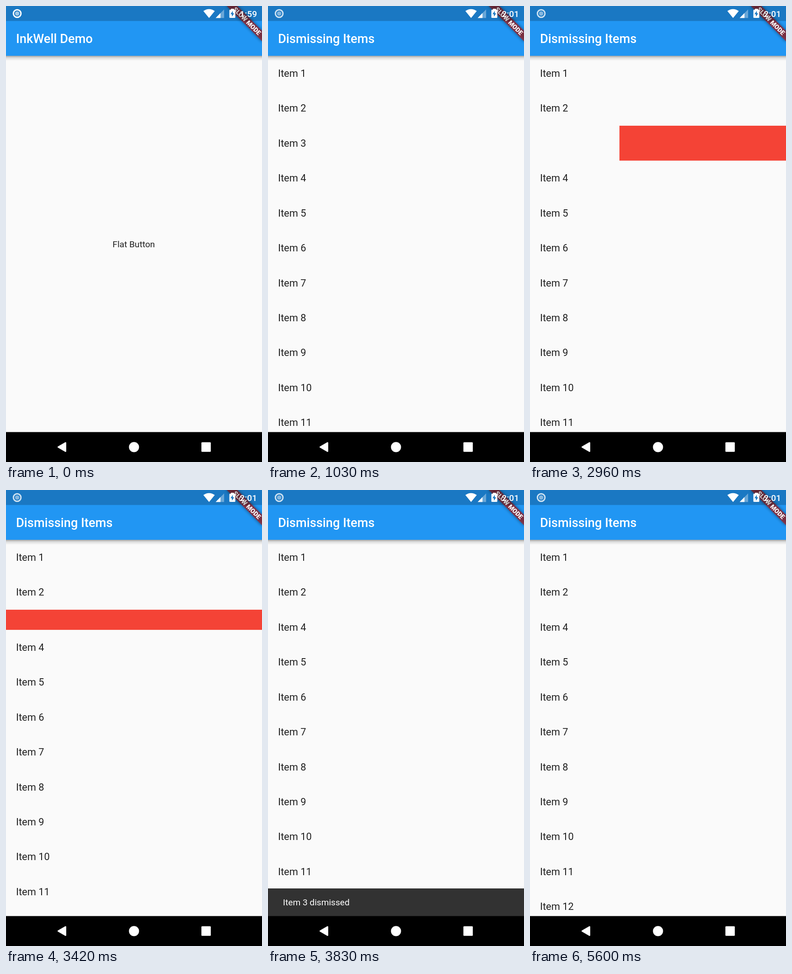
An HTML page for the animation above (6460 ms loop, 561 px wide and 998 px high).

```html
<!DOCTYPE html>
<html lang="en">
<head>
<meta charset="utf-8">
<title>Dismissing Items</title>
<style>
  html, body { margin: 0; width: 100%; height: 100%; overflow: hidden; background: #fafafa; }
  svg { display: block; width: 561px; height: 998px; font-family: Roboto, sans-serif; }
  .body { font-size: 21.84px; fill: #212121; }
  .small { font-size: 19.11px; }
  .title { font-size: 27.3px; font-weight: 500; fill: #fff; }
  .clock { font-size: 19.11px; font-weight: 500; fill: #fff; text-anchor: end; }
  .ribbon { font-size: 13.9px; font-weight: 900; fill: #fff; text-anchor: middle; }
</style>
</head>
<body>
<svg viewBox="0 0 561 998">
  <defs>
    <linearGradient id="shade" x2="0" y2="1">
      <stop offset="0" stop-opacity=".34"/>
      <stop offset=".4" stop-opacity=".12"/>
      <stop offset="1" stop-opacity="0"/>
    </linearGradient>
    <filter id="blur" x="-10%" y="-60%" width="120%" height="220%"><feGaussianBlur stdDeviation="3.5"/></filter>
  </defs>
  <rect width="561" height="998" fill="#fafafa"/>

  <text id="button" class="small" x="280" y="527.5" text-anchor="middle" fill="#212121">Flat Button</text>
  <g id="list" class="body"><rect id="reveal" y="262" fill="#f44336"/></g>

  <g id="snack">
    <rect y="872" width="561" height="62" fill="#323232"/>
    <text id="message" class="small" x="32.8" y="909" fill="#fff">Item 3 dismissed</text>
  </g>

  <!-- app bar and corner ribbon -->
  <rect y="109" width="561" height="11" fill="url(#shade)"/>
  <rect width="561" height="109" fill="#2196f3"/>
  <text id="title" class="title" x="22" y="80.5"></text>
  <g transform="translate(561 0) rotate(45)">
    <rect x="-55" y="38.2" width="110" height="16.4" fill-opacity=".5" filter="url(#blur)"/>
    <rect x="-55" y="38.2" width="110" height="16.4" fill="#b71c1c" fill-opacity=".627"/>
    <text class="ribbon" y="51.4">SLOW MODE</text>
  </g>

  <!-- status bar -->
  <rect width="561" height="32.8" fill-opacity=".2"/>
  <g id="record" fill="none" stroke="#fff">
    <circle cx="24.5" cy="16.5" r="8.3" stroke-width="3"/>
    <circle cx="24.5" cy="16.5" r="4.8" fill="#fff" fill-opacity=".6" stroke="none"/>
  </g>
  <g fill="#fff">
    <path d="M432.5 11Q444.8 2.5 457.5 11L445 26.3Z"/>
    <path d="M459.5 26.3L478 7.5V26.3Z" fill-opacity=".35"/>
    <path d="M459.5 26.3L470 15.6V26.3Z"/>
    <path d="M493 8V6h6v2h2q1.5 0 1.5 1.5v15q0 1.5-1.5 1.5h-10q-1.5 0-1.5-1.5v-15q0-1.5 1.5-1.5Z"/>
    <path d="M497 10.5L492 18h3v5.5L500 16h-3Z" fill="#1a78c2"/>
  </g>
  <text id="clock" class="clock" x="550" y="23.5"></text>

  <!-- navigation bar -->
  <rect y="932.5" width="561" height="66"/>
  <g fill="#fff" stroke="#fff" stroke-linejoin="round" stroke-width="3">
    <path d="M114.5 965.2L130.5 956V974.5Z"/>
    <circle cx="280.5" cy="965.3" r="9.6"/>
    <rect x="429.7" y="956.2" width="17.6" height="18"/>
  </g>
</svg>
<script>
const LOOP = 6460, WIDTH = 561, ROW = 76.42, SWIPED = 3;
const CUT = 50, SWIPE = 2550, RESIZE = 3249, SNACK_IN = 3552, SNACK_OUT = 5335;
const TICK = 41.2;
// time, distance dragged to the left
const drag = [[2550, 37], [2660, 98], [2760, 170], [2860, 264], [2962, 365], [3010, 418],
              [3050, 470], [3090, 510], [3130, 538], [3170, 553], [3240, 561]];

const $ = id => document.getElementById(id);
const clamp = v => Math.min(1, Math.max(0, v));

function bezier(x1, y1, x2, y2) {
  const at = (a, b, u) => 3 * a * u * (1 - u) ** 2 + 3 * b * u * u * (1 - u) + u ** 3;
  return x => {
    let lo = 0, hi = 1;
    for (let i = 0; i < 24; i++) {
      const mid = (lo + hi) / 2;
      if (at(x1, x2, mid) < x) lo = mid; else hi = mid;
    }
    return at(y1, y2, (lo + hi) / 2);
  };
}
const ease = bezier(.25, .1, .25, 1);
const fastOutSlowIn = bezier(.4, 0, .2, 1);

function dragged(t) {
  if (t < SWIPE) return 0;
  const i = drag.findIndex(([time]) => time > t);
  if (i < 0) return WIDTH;
  const [t0, x0] = drag[i - 1], [t1, x1] = drag[i];
  return x0 + (x1 - x0) * (t - t0) / (t1 - t0);
}

const rows = Array.from({ length: 12 }, (_, i) => {
  const row = document.createElementNS('http://www.w3.org/2000/svg', 'text');
  row.textContent = `Item ${i + 1}`;
  row.setAttribute('y', 155 + i * ROW);
  row.setAttribute('x', 22);
  $('list').append(row);
  return row;
});

function draw(t) {
  const listShown = t >= CUT;
  $('button').style.display = listShown ? 'none' : '';
  $('list').style.display = listShown ? '' : 'none';
  $('title').textContent = listShown ? 'Dismissing Items' : 'InkWell Demo';
  $('clock').textContent = listShown ? '2:01' : '1:59';
  $('record').setAttribute('opacity', listShown ? .78 : 1);

  t = SWIPE + Math.floor((t - SWIPE + 4) / TICK) * TICK;

  const offset = dragged(t);
  const shrink = ease(clamp(((t - RESIZE) / 300 - .4) / .6));
  const reveal = $('reveal');
  reveal.setAttribute('x', WIDTH - offset);
  reveal.setAttribute('width', offset);
  reveal.setAttribute('height', t < SNACK_IN ? ROW * (1 - shrink) : 0);
  rows.forEach((row, i) => {
    const n = i + 1;
    const x = n === SWIPED ? -offset : 0;
    const y = n > SWIPED ? -ROW * shrink : 0;
    row.setAttribute('transform', `translate(${x} ${y})`);
  });

  const leaving = t >= SNACK_OUT;
  const phase = leaving ? 1 - clamp((t - SNACK_OUT) / 250) : clamp((t - SNACK_IN) / 250);
  $('snack').setAttribute('transform', `translate(0 ${62 * (1 - fastOutSlowIn(phase))})`);
  $('message').setAttribute('opacity', leaving ? 1 : clamp((phase - .72) / .28));
}

const start = performance.now();
function frame() {
  draw((performance.now() - start) % LOOP);
  requestAnimationFrame(frame);
}
frame();
</script>
</body>
</html>
```
